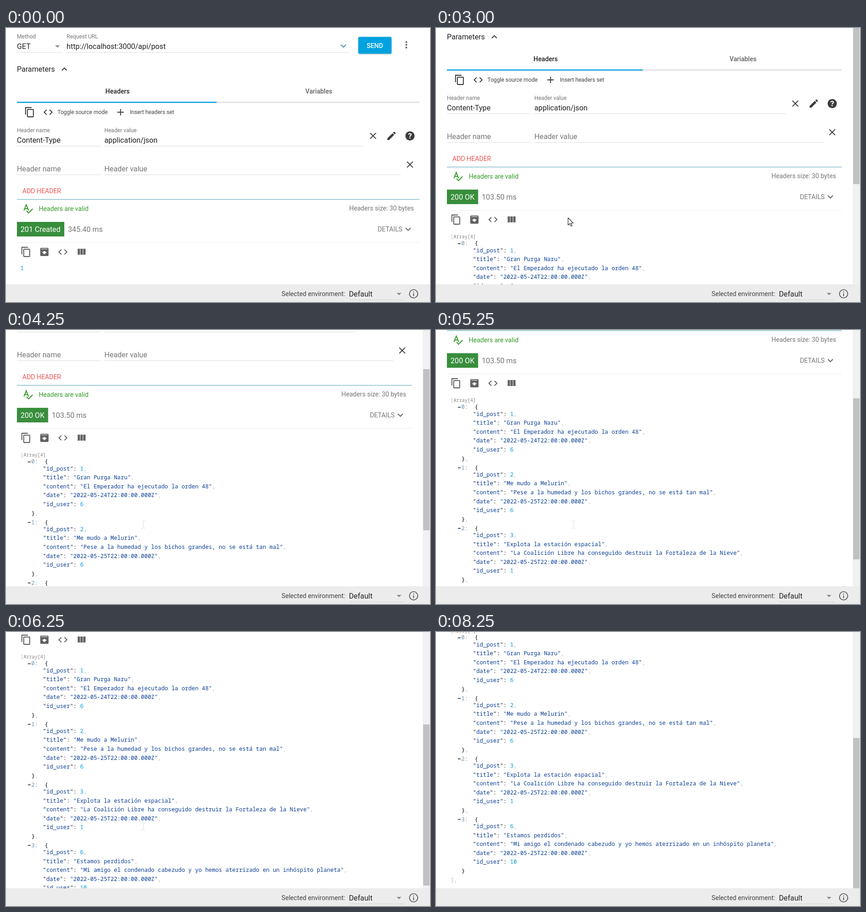
An HTML page with a canvas that plays this animation: 931 by 602 pixels, repeating every 9 s.

```html
<!DOCTYPE html>
<html lang="en">
<head>
<meta charset="utf-8">
<title>REST client</title>
<style>
html, body { margin: 0; width: 100%; height: 100%; overflow: hidden; background: #fff; }
canvas { display: block; width: 931px; height: 602px; }
</style>
</head>
<body>
<canvas id="stage"></canvas>
<script>
const W = 931, H = 602, LOOP = 9000, STEP = 250;
const canvas = document.getElementById('stage');
const ctx = canvas.getContext('2d');
const dpr = window.devicePixelRatio || 1;
canvas.width = W * dpr;
canvas.height = H * dpr;

const SANS = 'Roboto, sans-serif', MONO = '"Noto Sans Mono", monospace';
const S = 12.15, M = 14.175, L = 16.2, CODE = 12.38;
const DARK = '#212121', ICON = '#3c3c3c', GREY = '#757575', TOOL = '#616161';
const LINE = '#dcdcdc', BLUE = '#00a2df', GREEN = '#339a28', NAVY = '#0b3f94', PALE = '#b8b8b8';

const posts = [
  [1, 'Gran Purga Naru', 'El Emperador ha ejecutado la orden 48', 24, 6],
  [2, 'Me mudo a Melurin', 'Pese a la humedad y los bichos grandes, no se está tan mal', 25, 6],
  [3, 'Explota la estación espacial', 'La Coalición Libre ha conseguido destruir la Fortaleza de la Nieve', 25, 1],
  [6, 'Estamos perdidos', 'Mi amigo el condenado cabezudo y yo hemos aterrizado en un inhóspito planeta', 25, 10]
];

// [time, scroll offset]
const scrollKeys = [[2750, 0], [3000, 71], [3250, 125], [3500, 165], [4000, 210], [4250, 255],
  [4750, 345], [5000, 345], [5750, 435], [6000, 450], [6750, 525], [7000, 532]];
// [time, x, y]
const pointerKeys = [[250, 443, 195], [500, 560, 152], [750, 700, 96], [1000, 831, 35], [1250, 818, 43],
  [2000, 818, 43], [2250, 690, 150], [2500, 430, 320], [2750, 290, 417], [3000, 290, 417],
  [3250, 301, 427], [7250, 301, 427], [7500, 292, 480], [7750, 275, 560], [8000, 262, 605]];

function at(keys, t) {
  if (t <= keys[0][0]) return keys[0].slice(1);
  for (let i = 1; i < keys.length; i++) {
    const a = keys[i - 1], b = keys[i];
    if (t <= b[0]) {
      const k = (t - a[0]) / (b[0] - a[0]);
      return a.slice(1).map((v, j) => Math.round(v + (b[j + 1] - v) * k));
    }
  }
  return keys[keys.length - 1].slice(1);
}

function box(x, y, w, h, color) {
  ctx.fillStyle = color;
  ctx.fillRect(x, y, w, h);
}

// y is the middle of the capitals
function text(str, x, y, size, color, opt = {}) {
  ctx.font = `${opt.weight || 400} ${size}px ${opt.font || SANS}`;
  ctx.textAlign = opt.align || 'left';
  ctx.fillStyle = color;
  ctx.fillText(str, x, y + size * 0.356);
  return x + ctx.measureText(str).width;
}

function poly(points, close) {
  ctx.beginPath();
  points.forEach(([x, y], i) => i ? ctx.lineTo(x, y) : ctx.moveTo(x, y));
  if (close) ctx.closePath();
}

function stroke(points, color, width = 2) {
  poly(points);
  ctx.strokeStyle = color;
  ctx.lineWidth = width;
  ctx.stroke();
}

function fill(points, color) {
  poly(points, true);
  ctx.fillStyle = color;
  ctx.fill();
}

function round(x, y, w, h, r, color) {
  ctx.beginPath();
  ctx.roundRect(x, y, w, h, r);
  ctx.fillStyle = color;
  ctx.fill();
}

function disc(x, y, r, color) {
  ctx.beginPath();
  ctx.arc(x, y, r, 0, Math.PI * 2);
  ctx.fillStyle = color;
  ctx.fill();
}

// icons live on a 24 unit grid
const icons = {
  copy(c) {
    stroke([[16, 2], [3, 2], [3, 17]], c);
    ctx.beginPath();
    ctx.roundRect(7, 6, 13, 16, 1);
    ctx.stroke();
  },
  code(c) {
    stroke([[8.7, 6.7], [3.4, 12], [8.7, 17.3]], c);
    stroke([[15.3, 6.7], [20.6, 12], [15.3, 17.3]], c);
  },
  plus(c) {
    box(5, 11, 14, 2, c);
    box(11, 5, 2, 14, c);
  },
  close(c) {
    stroke([[5.7, 5.7], [18.3, 18.3]], c);
    stroke([[18.3, 5.7], [5.7, 18.3]], c);
  },
  pencil(c) {
    fill([[3, 17.2], [14.1, 6.2], [17.8, 9.9], [6.8, 21], [3, 21]], c);
    fill([[15.1, 5.1], [17.3, 3], [18.3, 3.2], [20.8, 5.7], [21, 6.7], [18.9, 8.9]], c);
  },
  help(c) {
    disc(12, 12, 10, c);
    text('?', 12, 12.3, 17, '#fff', { align: 'center', weight: 700 });
  },
  info(c) {
    ctx.beginPath();
    ctx.arc(12, 12, 9, 0, Math.PI * 2);
    ctx.strokeStyle = c;
    ctx.lineWidth = 1.9;
    ctx.stroke();
    box(11, 7, 2, 2, c);
    box(11, 11, 2, 6, c);
  },
  archive(c) {
    round(3, 3, 18, 18, 2, c);
    box(5.2, 5, 13.6, 1, '#fff');
    fill([[12, 17.5], [6.5, 12], [10, 12], [10, 10], [14, 10], [14, 12], [17.5, 12]], '#fff');
  },
  columns(c) {
    for (const x of [4, 10, 16]) box(x, 5, 5, 13, c);
  },
  spell(c) {
    stroke([[3.4, 16], [8.5, 3.6], [13.6, 16]], c);
    stroke([[5.6, 12], [11.4, 12]], c);
    stroke([[9.1, 16.7], [13.5, 21.1], [22.3, 12.3]], c);
  },
  down(c) { stroke([[6.7, 9.3], [12, 14.6], [17.3, 9.3]], c); },
  up(c) { stroke([[6.7, 14.7], [12, 9.4], [17.3, 14.7]], c); },
  drop(c) { fill([[7, 10], [17, 10], [12, 15]], c); },
  more(c) { for (const y of [6, 12, 18]) disc(12, y, 2, c); }
};

function icon(name, x, y, color = ICON) {
  ctx.save();
  ctx.translate(x, y);
  ctx.scale(1.0125, 1.0125);
  ctx.translate(-12, -12);
  icons[name](color);
  ctx.restore();
}

function request(R, busy) {
  text('Method', 24, 19, S, GREY);
  text('GET', 24, 40, L, DARK);
  icon('drop', 113, 40, '#8a8a8a');
  box(24, 53, 101, 1, LINE);
  text('Request URL', 133, 19, S, GREY);
  text('http://localhost:3000/api/post', 133, 40, L, DARK);
  icon('down', R - 167, 39.5, '#4b8ca3');
  box(133, 53, R - 155 - 133, 1, LINE);

  ctx.save();
  ctx.shadowColor = 'rgba(0,0,0,.3)';
  ctx.shadowBlur = 3;
  ctx.shadowOffsetY = 1;
  round(R - 134.5, 19.5, 73, 37, 3, BLUE);
  ctx.restore();
  text(busy ? 'ABORT' : 'SEND', R - 98, 38.5, M, '#fff', { align: 'center', weight: 500 });
  icon('more', R - 29, 37, TOOL);
  text('Parameters', 24, 90, L, DARK);
  icon('up', 128, 90.5);
}

function headers(R) {
  const mid = (24 + R - 7) / 2, half = (24 + R) / 2 - 3.5;
  text('Headers', (24 + half + 0) / 2 + 1.7, 139, M, DARK, { align: 'center', weight: 500 });
  text('Variables', (mid + R) / 2 + 1.7, 139, M, TOOL, { align: 'center', weight: 500 });
  const split = (24 + R) / 2 - 3.5;
  box(24, 162, R - 24, 2.5, '#dedede');
  box(24, 162, split - 24, 2.5, BLUE);

  icon('copy', 52, 185);
  icon('code', 92.5, 185);
  text('Toggle source mode', 113, 184.5, S, '#424242');
  icon('plus', 251.5, 185);
  text('Insert headers set', 272, 184.5, S, '#424242');

  text('Header name', 24, 225, S, GREY);
  text('Content-Type', 24, 246, L, DARK);
  box(24, 259, 184, 1, LINE);
  text('Header value', 216, 225, S, GREY);
  text('application/json', 216, 246, L, DARK);
  box(216, 259, R - 122 - 216, 1, LINE);
  icon('close', R - 102, 237);
  icon('pencil', R - 61.5, 237);
  icon('help', R - 21, 237);

  text('Header name', 24, 309, L, GREY);
  box(24, 322, 184, 1, LINE);
  text('Header value', 216, 309, L, GREY);
  box(216, 322, R - 41 - 216, 1, LINE);
  icon('close', R - 21, 300);

  text('ADD HEADER', 36, 358, M, '#ef5350');
  box(24, 376, R - 24, 1, '#4fa3b5');
  icon('spell', 48, 397, GREEN);
  text('Headers are valid', 72, 397, M, GREEN);
  text('Headers size: 30 bytes', R - 12.5, 395.5, M, GREY, { align: 'right' });
}

function response(R, status, time, width) {
  box(24, 426, width, 32, '#388e3c');
  text(status, 32, 442, L, '#fff');
  text(time, 24 + width + 8, 442, L, GREY);
  text('DETAILS', R - 92, 442, M, GREY);
  icon('down', R - 25, 442, TOOL);
  box(24, 471, R - 24, 1, '#ebebeb');
  icon('copy', 44, 492, TOOL);
  icon('archive', 84.3, 492, TOOL);
  icon('code', 125, 492, TOOL);
  icon('columns', 165.5, 492, TOOL);
}

function mono(parts, x, y) {
  for (const [str, color] of parts) x = text(str, x, y, CODE, color, { font: MONO });
}

function json() {
  text('[', 32, 529, 10.2, PALE, { font: MONO });
  text('Array[4]', 38.5, 529, 10.2, '#858585', { font: MONO });
  posts.forEach(([id, title, content, day, user], i) => {
    const y = 544 + i * 133.15;
    box(48, Math.round(y), 6, 1.5, DARK);
    mono([[i + ':', '#6b95b5']], 55.5, y);
    mono([['{', '#000']], 85, y);
    const str = s => [['"', NAVY], [s, NAVY], ['"', NAVY]];
    const num = n => [[String(n), '#0099dd']];
    const rows = [
      ['id_post', num(id)],
      ['title', str(title)],
      ['content', str(content)],
      ['date', str(`2022-05-${day}T22:00:00.000Z`)],
      ['id_user', num(user)]
    ];
    rows.forEach(([key, value], j) => {
      const end = j < 4 ? [[',', PALE]] : [];
      mono([['"', '#222'], [key, NAVY], ['"', '#222'], [': ', '#222'], ...value, ...end],
        81, y + 15.3 + j * 19.55);
    });
    mono([['}', '#000'], [i < 3 ? ',' : '', PALE]], 56, y + 113.2);
  });
  mono([['],', PALE]], 32, 1076.5);
}

function scrollbar(offset) {
  box(915, 0, 16, 563, '#f1f1f1');
  box(916, Math.round(offset * 0.53 - 49), 14, 354, '#c1c1c1');
}

function footer() {
  box(0, 563, W, 39, '#ececec');
  text('Selected environment:', 605, 584, M, '#424242');
  text('Default', 753, 584, L, DARK);
  icon('drop', 863, 584, '#8a8a8a');
  box(754, 597, 120, 1, '#cfcfcf');
  icon('info', 895, 584, TOOL);
}

const arrow = [[0, 0], [0, 16], [3.8, 12.6], [6.4, 18.4], [8.8, 17.3], [6.3, 11.7], [11.3, 11.3]];
const hand = [[5, 1.5], [6.5, 0], [8, 1.5], [8, 7], [10, 6.6], [11, 8], [13, 7.6], [14, 9], [16, 9],
  [17, 11], [17, 15], [15, 18], [15, 21], [7, 21], [7, 19], [2, 13.5], [0.5, 11], [2, 10], [5, 12.5]];
const beam = [[-4, -8], [-1, -8], [0, -7], [1, -8], [4, -8]];

function pointer(t, offset) {
  if (t < 250 || t >= 8000) return;
  const [x, y] = at(pointerKeys, t);
  const onButton = t >= 1000 && t <= 2000;
  ctx.save();
  ctx.translate(x, y);
  if (t > 3000 && y < 563 && y + offset > 529) {
    ctx.translate(0.5, 0.5);
    stroke(beam, '#dedede', 1);
    stroke([[0, -7], [0, 7]], '#dedede', 1);
    stroke(beam.map(([a, b]) => [a, -b]), '#dedede', 1);
  } else {
    if (onButton) ctx.translate(-6.5, 0);
    ctx.lineJoin = 'round';
    const shape = onButton ? hand : arrow;
    fill(shape, '#fff');
    stroke([...shape, shape[0]], '#111', 1.1);
    if (onButton) for (const dx of [8, 11, 14]) stroke([[dx, 8], [dx, 11.5]], '#111', 1);
  }
  ctx.restore();
}

function draw(t) {
  const done = t >= 2000, busy = t >= 1750 && !done;
  const offset = at(scrollKeys, t)[0];
  const R = done ? 891 : 908;
  ctx.setTransform(dpr, 0, 0, dpr, 0, 0);
  box(0, 0, W, H, '#fff');

  ctx.save();
  ctx.translate(0, -offset);
  request(R, busy);
  headers(R);
  if (busy) {
    box(24, 413.5, R - 24, 4, '#e0e0e0');
  } else if (done) {
    response(R, '200 OK', '103.50 ms', 68.5);
    json();
  } else {
    response(R, '201 Created', '345.40 ms', 104);
    text('1', 31.5, 528, CODE, '#0094d0', { font: MONO });
  }
  ctx.restore();

  if (done) scrollbar(offset);
  footer();
  pointer(t, offset);
}

const start = performance.now();
function tick() {
  const t = (performance.now() - start) % LOOP;
  draw(Math.floor(t / STEP) * STEP);
  requestAnimationFrame(tick);
}
tick();
</script>
</body>
</html>
```
